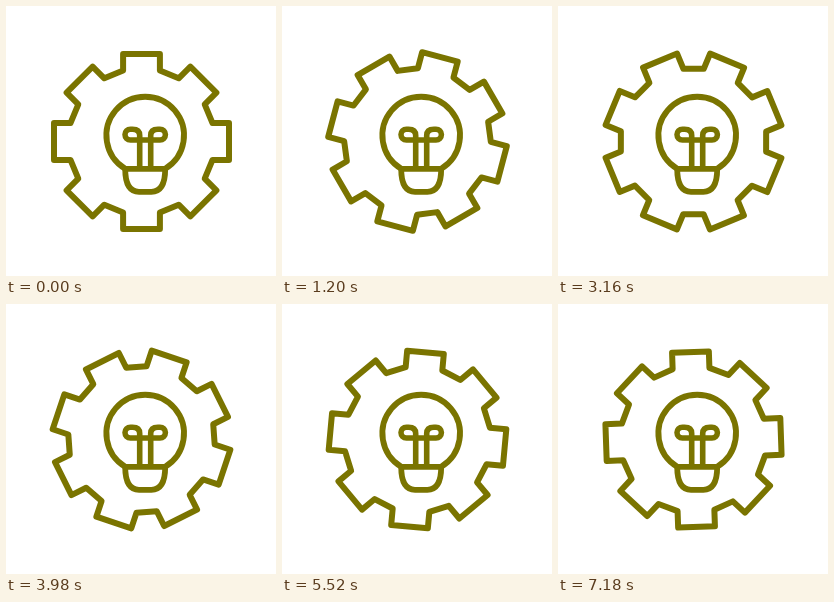
An HTML page with a canvas for the animation above (7.2 s loop, 270 by 270 pixels).

```html
<!DOCTYPE html>
<html lang="en">
<head>
<meta charset="utf-8">
<title>Idea gear</title>
<style>
  html, body { margin: 0; width: 100%; height: 100%; overflow: hidden; background: #fff; }
  canvas { display: block; width: 270px; height: 270px; }
</style>
</head>
<body>
<canvas id="stage"></canvas>
<script>
const SIZE = 270, LOOP = 7200, STEP = 20;
const TURN = LOOP + STEP; // a full turn ends one step after the loop restarts
const INK = '#7a7400';
const CENTER = 135.5, TEETH = 8, TIP = 87.5, ROOT = 71, HALF = 18.4;

const canvas = document.getElementById('stage');
const ctx = canvas.getContext('2d');
const ratio = window.devicePixelRatio || 1;
canvas.width = canvas.height = SIZE * ratio;

function buildGear() {
  const path = new Path2D();
  const corners = [[-HALF, ROOT], [-HALF, TIP], [HALF, TIP], [HALF, ROOT]];
  for (let i = 0; i < TEETH; i++) {
    const a = i * 2 * Math.PI / TEETH, c = Math.cos(a), s = Math.sin(a);
    for (const [x, r] of corners) path.lineTo(x * c + r * s, x * s - r * c);
  }
  path.closePath();
  return path;
}

const gear = buildGear();
const glass = new Path2D('M119.2 162.8 A38.8 38.8 0 1 1 159.2 162.8 Z');
const base = new Path2D('M119.2 162.8 C119.2 178 124 185.8 133 185.8 H145.4 C154.4 185.8 159.2 178 159.2 162.8');
const filament = new Path2D(
  'M133.7 162 V129.5 C133.7 125.2 131 123.2 126.5 123.2 H124.4 A5.4 5.4 0 0 0 124.4 134' +
  ' H154 A5.4 5.4 0 0 0 154 123.2 H151.9 C147.4 123.2 144.7 125.2 144.7 129.5 V162');

function stroke(path, width) {
  ctx.lineWidth = width;
  ctx.stroke(path);
}

function draw(time) {
  const t = Math.floor((time % LOOP) / STEP) * STEP;
  ctx.setTransform(ratio, 0, 0, ratio, 0, 0);
  ctx.fillStyle = '#fff';
  ctx.fillRect(0, 0, SIZE, SIZE);
  ctx.strokeStyle = INK;
  ctx.lineJoin = ctx.lineCap = 'round';

  ctx.save();
  ctx.translate(CENTER, CENTER);
  ctx.rotate(2 * Math.PI * t / TURN);
  stroke(gear, 6);
  ctx.restore();

  stroke(glass, 5.8);
  stroke(base, 5.8);
  stroke(filament, 5.6);
}

const start = performance.now();
function tick() {
  draw(performance.now() - start);
  requestAnimationFrame(tick);
}
tick();
</script>
</body>
</html>
```
